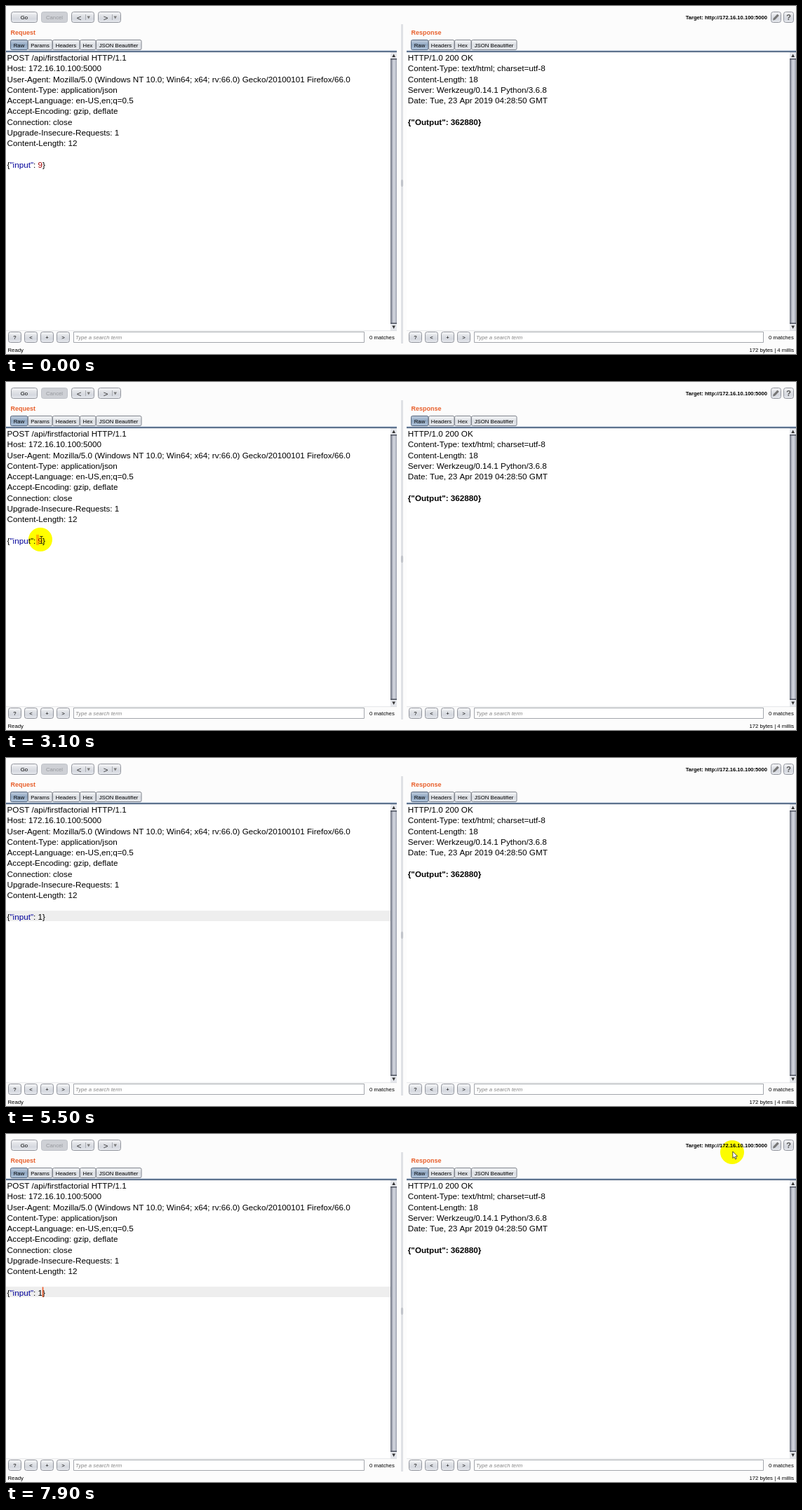
Recreate the animation shown at these times as an HTML page with a canvas. Size 1126 by 497 pixels, loop 8 s.

```html
<!DOCTYPE html>
<html lang="en">
<head>
<meta charset="utf-8">
<title>HTTP repeater</title>
<style>
html, body { margin: 0; width: 100%; height: 100%; overflow: hidden; background: #fcfcfc; }
canvas { display: block; }
</style>
</head>
<body>
<canvas id="stage" width="1126" height="497"></canvas>
<script>
const ctx = document.getElementById('stage').getContext('2d');
const LOOP = 8000, STEP = 100;
const LINE_TOP = 78, LINE_HEIGHT = 15.25, BODY = 11.7, UI = 7.75;
const INPUT_BASELINE = LINE_TOP + 10 * LINE_HEIGHT;

const REQUEST = [
  'POST /api/firstfactorial HTTP/1.1',
  'Host: 172.16.10.100:5000',
  'User-Agent: Mozilla/5.0 (Windows NT 10.0; Win64; x64; rv:66.0) Gecko/20100101 Firefox/66.0',
  'Content-Type: application/json',
  'Accept-Language: en-US,en;q=0.5',
  'Accept-Encoding: gzip, deflate',
  'Connection: close',
  'Upgrade-Insecure-Requests: 1',
  'Content-Length: 12'
];
const RESPONSE = [
  'HTTP/1.0 200 OK',
  'Content-Type: text/html; charset=utf-8',
  'Content-Length: 18',
  'Server: Werkzeug/0.14.1 Python/3.6.8',
  'Date: Tue, 23 Apr 2019 04:28:50 GMT'
];

// Pointer path: time, x, y
const PATH = [
  [100, 198, 72], [200, 640, 205], [300, 937, 269], [1800, 937, 269],
  [1900, 866, 264], [2100, 480, 248], [2300, 130, 233], [2500, 33, 224],
  [2700, 45, 223], [2800, 42, 224], [3100, 49, 225], [3600, 51, 225],
  [4000, 71, 262], [5100, 71, 262], [5300, 150, 180], [5400, 300, 60],
  [5500, 420, -40], [5800, 960, -30], [6000, 1044, 17], [6200, 1064, 21],
  [6400, 1056, 25], [6800, 1062, 20], [7100, 1062, 20], [7300, 1061, 21],
  [7800, 1061, 21], [7900, 1035, 26]
];
const CARET_ON = [[3700, 4200], [4500, 5200], [5600, 6100], [6700, 7200], [7800, 8000]];

function text(str, x, y, size = UI, color = '#000', style = '', align = 'left') {
  ctx.font = `${style} ${size}px "Liberation Sans", Arial, sans-serif`;
  ctx.fillStyle = color;
  ctx.textAlign = align;
  ctx.fillText(str, x, y);
  return x + ctx.measureText(str).width;
}

function rect(x, y, w, h, color) {
  ctx.fillStyle = color;
  ctx.fillRect(x, y, w, h);
}

function gradient(x0, y0, x1, y1, ...colors) {
  const g = ctx.createLinearGradient(x0, y0, x1, y1);
  colors.forEach((c, i) => g.addColorStop(i / (colors.length - 1), c));
  return g;
}

function box(x, y, w, h, radius, fill, stroke) {
  ctx.beginPath();
  ctx.roundRect(x + .5, y + .5, w - 1, h - 1, radius);
  ctx.fillStyle = fill;
  ctx.fill();
  ctx.strokeStyle = stroke;
  ctx.lineWidth = 1;
  ctx.stroke();
}

function polygon(points, fill, stroke) {
  ctx.beginPath();
  points.forEach(([x, y]) => ctx.lineTo(x, y));
  ctx.closePath();
  ctx.fillStyle = fill;
  ctx.fill();
  if (stroke) {
    ctx.strokeStyle = stroke;
    ctx.lineWidth = .8;
    ctx.stroke();
  }
}

function button(label, x, y, w, h, disabled) {
  const fill = disabled ? '#ced0d5' : gradient(0, y, 0, y + h, '#fcfcfd', '#e2e4e8', '#d5d8df', '#eceef2');
  box(x, y, w, h, 3, fill, disabled ? '#bfc2c8' : '#92959d');
  text(label, x + w / 2, y + h / 2 + 2.8, UI, disabled ? '#96989d' : '#000', '', 'center');
}

function historyButton(label, x) {
  button('', x, 8, 33, 16);
  text(label, x + 11, 20.5, 11.5, '#333', '', 'center');
  rect(x + 20, 12, 1, 8, '#a9acb2');
  polygon([[x + 22.5, 14.5], [x + 27, 14.5], [x + 24.7, 18.5]], '#777');
}

function scrollbar(x) {
  rect(x, 66, 9, 398, '#e5e7ec');
  rect(x, 76, 9, 378, gradient(x, 0, x + 9, 0, '#686d7a', '#a4a8b5', '#d2d5de', '#c4c8d3', '#9ca0ad'));
  rect(x, 75, 9, 1.5, '#4c515e');
  rect(x, 452.5, 9, 1.5, '#4c515e');
  polygon([[x + 2.3, 73], [x + 7, 73], [x + 4.7, 68.5]], '#333');
  polygon([[x + 2.3, 456.5], [x + 7, 456.5], [x + 4.7, 461]], '#333');
}

function panel(title, left, width, tabs, edges) {
  text(title, left + 6.5, 41, 9, '#e8602c', 'bold');
  tabs.forEach((label, i) => {
    const x = edges[i], w = edges[i + 1] - x;
    const fill = i ? gradient(0, 48, 0, 63, '#f8f9fa', '#dcdfe4', '#e8eaee')
                   : gradient(0, 48, 0, 63, '#c4d0df', '#91a8c3', '#b4c8de');
    box(x, 48, w + .5, 15, 2, fill, i ? '#7f838c' : '#56667d');
    text(label, x + w / 2, 58.7, UI, '#000', '', 'center');
  });
  rect(left, 63, width, 1.5, '#c1cddd');
  rect(left, 64.5, width, 1.5, '#334c6e');
  rect(left, 66, width, 398, '#fff');
  scrollbar(left + width - 9);
  rect(left, 463.5, width, .6, '#d3d5d9');
  [['?', 3], ['<', 26], ['+', 49], ['>', 72]].forEach(([s, x]) => button(s, left + x, 465, 19, 16));
  box(left + 96, 465, width - 142, 16, 0, '#fff', '#a3a6ac');
  text('Type a search term', left + 99, 475.7, UI, '#858585', 'italic');
  text('0 matches', left + width - 39, 475.7);
}

function lines(list, x) {
  list.forEach((line, i) => text(line, x, LINE_TOP + i * LINE_HEIGHT, BODY));
}

function inputLine(t) {
  if (t >= 3800) rect(0, 218, 548, 15, '#eeeeee');
  if (t >= 2900 && t < 3700) rect(43, 218, t < 3200 ? 4 : 8, 15, '#ffb5a0');
  const plain = t === 4500 || t === 4800;
  const digit = t < 4500 ? '9' : t < 4800 ? '' : '1';
  let x = text('{', 1.5, INPUT_BASELINE, BODY);
  x = text('"input"', x, INPUT_BASELINE, BODY, plain ? '#000' : '#00009a');
  x = text(': ', x, INPUT_BASELINE, BODY);
  const end = text(digit, x, INPUT_BASELINE, BODY, digit === '9' ? '#a00000' : '#000');
  text('}', end, INPUT_BASELINE, BODY);
  if (CARET_ON.some(([on, off]) => t >= on && t < off)) {
    rect((t < 4500 ? x : end) - .3, 218.5, 1.6, 14.5, '#f05a28');
  }
}

function pointerAt(t) {
  if (t < PATH[0][0]) return null;
  const next = PATH.findIndex(p => p[0] > t);
  if (next < 0) return PATH[PATH.length - 1].slice(1);
  const [t0, x0, y0] = PATH[next - 1], [t1, x1, y1] = PATH[next];
  const k = (t - t0) / (t1 - t0);
  return [x0 + (x1 - x0) * k, y0 + (y1 - y0) * k];
}

function pointer(x, y) {
  ctx.globalCompositeOperation = 'multiply';
  ctx.beginPath();
  ctx.arc(x, y, 17, 0, Math.PI * 2);
  ctx.fillStyle = '#ff0';
  ctx.fill();
  ctx.globalCompositeOperation = 'source-over';
  if (y > 66) {
    const ink = '#38380a';
    rect(x + .9, y - 4.5, 1, 10, ink);
    rect(x - .8, y - 5, 4.4, 1, ink);
    rect(x - .8, y + 5, 4.4, 1, ink);
  } else {
    const shape = [[0, 0], [0, 9.5], [2.2, 7.6], [3.8, 11], [5.3, 10.3], [3.8, 7], [6.7, 6.8]];
    polygon(shape.map(([dx, dy]) => [x + .8 + dx, y - 1 + dy]), '#fff', '#222');
  }
}

function pencil() {
  button('', 1090, 8, 15, 16);
  polygon([[1093, 20.5], [1093.8, 17.5], [1099.5, 11.5], [1101.8, 13.8], [1096, 19.7]], '#777');
}

function draw(t) {
  rect(0, 0, 1126, 497, '#fcfcfc');
  button('Go', 7, 8, 38, 16);
  button('Cancel', 50, 8, 38, 16, true);
  historyButton('<', 93);
  historyButton('>', 131);
  text('Target: http://172.16.10.100:5000', 1085, 19, 7.6, '#000', 'bold', 'right');
  pencil();
  button('', 1108, 8, 15, 16);
  text('?', 1115.5, 20.3, 11.5, '#555', 'bold', 'center');

  panel('Request', 0, 557, ['Raw', 'Params', 'Headers', 'Hex', 'JSON Beautifier'], [6, 31, 66, 105, 128, 193]);
  panel('Response', 571, 555, ['Raw', 'Headers', 'Hex', 'JSON Beautifier'], [577, 602, 639, 663, 728]);
  rect(563, 26, 3, 456, '#dfe1e5');
  box(563, 248, 3, 10, 1, '#d0d3d9', '#b4b7be');

  lines(REQUEST, 1.5);
  inputLine(t);
  lines(RESPONSE, 572.8);
  text('{"Output": 362880}', 572.8, LINE_TOP + 6 * LINE_HEIGHT, BODY, '#000', 'bold');

  text('Ready', 2.5, 494);
  text('172 bytes | 4 millis', 1123, 494, UI, '#000', '', 'right');

  const position = pointerAt(t);
  if (position) pointer(...position);
}

const start = performance.now();
function frame() {
  const t = (performance.now() - start) % LOOP;
  draw(Math.floor(t / STEP) * STEP);
  requestAnimationFrame(frame);
}
frame();
</script>
</body>
</html>
```
